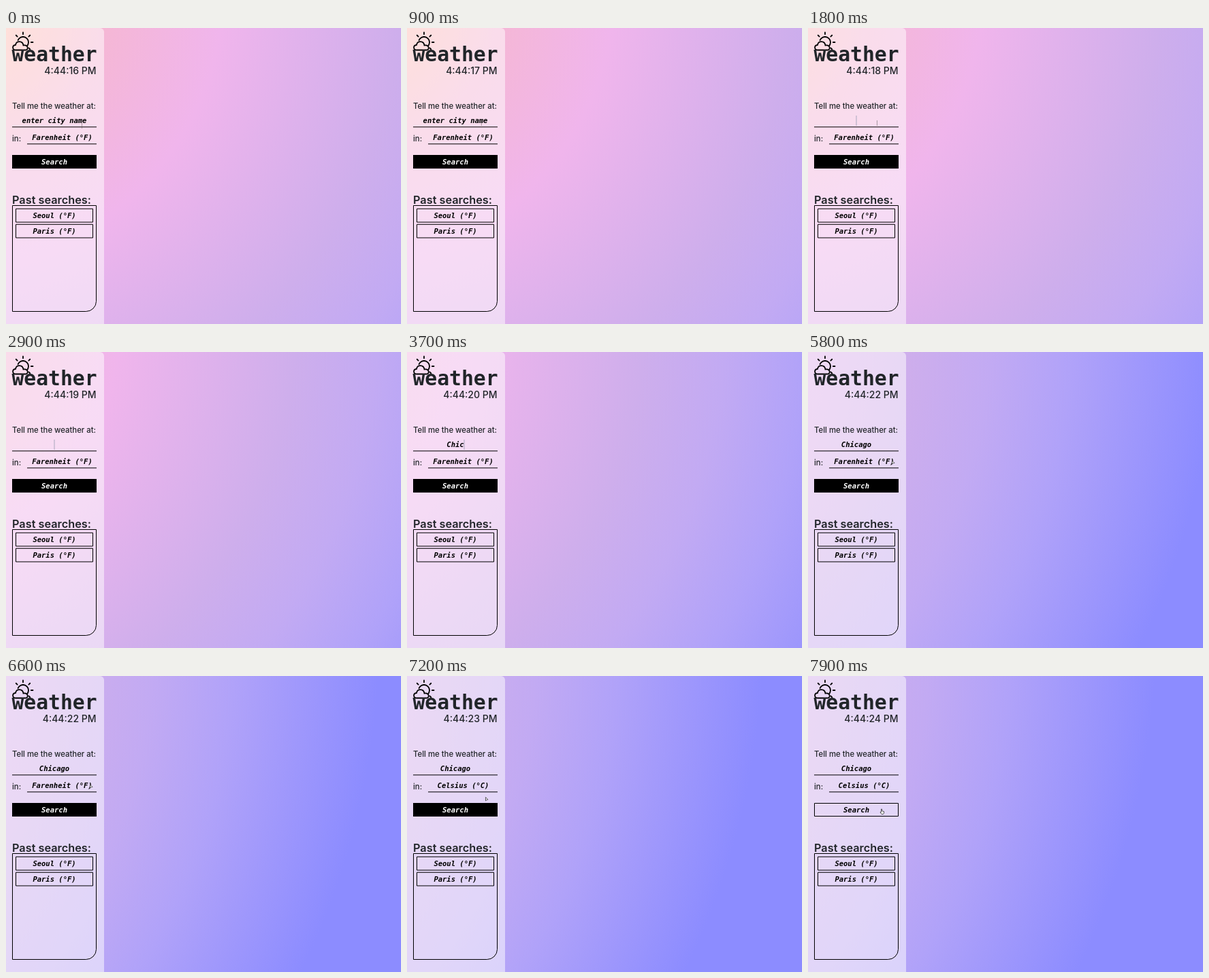
These frames come from a looping animation (580 by 436 pixels, 8 s). An HTML page with a canvas:

```html
<!DOCTYPE html>
<html lang="en">
<head>
<meta charset="utf-8">
<title>Weather</title>
<style>
html, body { margin: 0; width: 100%; height: 100%; overflow: hidden; }
canvas { display: block; width: 580px; height: 436px; }
</style>
</head>
<body>
<canvas id="stage"></canvas>
<script>
const W = 580, H = 436, LOOP = 8000;
const canvas = document.getElementById('stage');
const ctx = canvas.getContext('2d');
const ratio = window.devicePixelRatio || 1;
canvas.width = W * ratio;
canvas.height = H * ratio;

const INK = '#212529';
const SANS = 'Inter, "Open Sans", sans-serif';
const MONO = '"DejaVu Sans Mono", "Liberation Mono", monospace';
const FIELD = 'italic bold 10.5px ' + MONO;
const TITLE = 'bold 29.7px ' + MONO;
const LABEL = '500 11.35px ' + SANS;

// gradient radius and colour
const REACH = 1130;
const STOPS = [
  [0, '#ffc0a8'], [117, '#ffbeb2'], [257, '#f5b7d6'], [420, '#f0b5ec'],
  [680, '#ceaeec'], [800, '#c2aaf3'], [920, '#b0a2f9'], [REACH, '#8c8cff']
];
const POINTER = [
  [0, 111, 144], [700, 111, 140], [1400, 100, 140], [4300, 118, 141],
  [4500, 127, 145], [5300, 125, 163], [6900, 125, 163], [7500, 109, 200], [8000, 109, 200]
];
const CITY = 'Chicago';
const FOCUS = 1450, TYPE_START = 3200, KEY_MS = 130, BLUR = 4480;
const PICK = 7000, HOVER = 7400;

function text(str, x, y, font, color = INK, align = 'left') {
  ctx.font = font;
  ctx.fillStyle = color;
  ctx.textAlign = align;
  ctx.fillText(str, x, y);
}

function line(x1, y1, x2, y2, color = '#000', width = 1) {
  ctx.strokeStyle = color;
  ctx.lineWidth = width;
  ctx.beginPath();
  ctx.moveTo(x1, y1);
  ctx.lineTo(x2, y2);
  ctx.stroke();
}

function box(x, y, w, h, radii = 0) {
  ctx.strokeStyle = '#000';
  ctx.lineWidth = 1;
  ctx.beginPath();
  ctx.roundRect(x + 0.5, y + 0.5, w - 1, h - 1, radii);
  ctx.stroke();
}

function background(t) {
  const cx = -100 - 260 * (1 - Math.cos(Math.PI * t / LOOP)), cy = -60;
  const g = ctx.createRadialGradient(cx, cy, 0, cx, cy, REACH);
  for (const [r, color] of STOPS) g.addColorStop(r / REACH, color);
  ctx.fillStyle = g;
  ctx.fillRect(0, 0, W, H);
  ctx.fillStyle = 'rgba(255,255,255,0.52)';
  ctx.beginPath();
  ctx.roundRect(0, 0, 144, H, [0, 6, 0, 0]);
  ctx.fill();
}

function icon() {
  ctx.lineCap = 'round';
  for (const deg of [-135, -90, -45, 0, 45]) {
    const c = Math.cos(deg * Math.PI / 180), s = Math.sin(deg * Math.PI / 180);
    line(25 + 11.8 * c, 21 + 11.8 * s, 25 + 14.5 * c, 21 + 14.5 * s, '#000', 1.8);
  }
  ctx.beginPath();
  ctx.arc(25, 21, 8, -2.75, 0.65);
  ctx.stroke();
  ctx.beginPath();
  ctx.moveTo(14.5, 32.5);
  ctx.bezierCurveTo(9, 32.5, 8.5, 25.5, 14, 25);
  ctx.bezierCurveTo(15, 18.5, 24.5, 18.5, 25.5, 25.5);
  ctx.bezierCurveTo(33, 24.5, 33.5, 32.5, 28.5, 32.5);
  ctx.closePath();
  ctx.stroke();
  ctx.lineCap = 'butt';
}

function cityField(t) {
  const count = Math.max(0, Math.min(CITY.length, Math.floor((t - TYPE_START) / KEY_MS) + 1));
  const value = t < FOCUS ? 'enter city name' : CITY.slice(0, count);
  text(value, 71, 140, FIELD, '#000', 'center');
  const lastKey = TYPE_START + (count - 1) * KEY_MS;
  const since = t - (count ? lastKey : FOCUS);
  if (t >= FOCUS && t < BLUR && since % 1000 < 500) {
    const x = Math.round(71 + ctx.measureText(value).width / 2);
    line(x, 129, x, 144, '#a9a7bd');
  }
}

function pointerAt(t) {
  let i = 0;
  while (i < POINTER.length - 2 && t >= POINTER[i + 1][0]) i++;
  const [t0, x0, y0] = POINTER[i], [t1, x1, y1] = POINTER[i + 1];
  const p = (t - t0) / (t1 - t0), e = p * p * (3 - 2 * p);
  return [x0 + (x1 - x0) * e, y0 + (y1 - y0) * e];
}

function shape(points, x, y) {
  ctx.beginPath();
  points.forEach(([px, py]) => ctx.lineTo(x + px, y + py));
  ctx.closePath();
  ctx.fillStyle = '#fff';
  ctx.fill();
  ctx.strokeStyle = '#333';
  ctx.lineWidth = 0.8;
  ctx.stroke();
}

function pointer(t) {
  if (t > 2300 && t < 4300) return;
  const [x, y] = pointerAt(t);
  if (t < 4850) {
    ctx.setLineDash([1, 1]);
    line(x + 0.5, y - 3.5, x + 0.5, y + 3.5, '#555');
    ctx.setLineDash([]);
  } else if (y < 186) {
    shape([[-1.5, -3], [2, 0.5], [0.2, 0.8], [-1.5, 2.2]], x, y);
  } else {
    shape([[-1.5, -4], [-0.4, -4], [-0.2, -1], [2.5, -0.5], [2.5, 2], [1.5, 3.5], [-1, 3.5], [-3, 0.5], [-1.5, 0.5]], x, y);
  }
}

function button(t) {
  const k = Math.max(0, Math.min(1, (t - HOVER) / 200));
  ctx.fillStyle = `rgba(0,0,0,${1 - k})`;
  ctx.fillRect(9, 187, 124, 20);
  box(9, 187, 124, 20);
  const v = Math.round(255 * (1 - k));
  text('Search', 71, 201, FIELD, `rgb(${v},${v},${v})`, 'center');
}

function draw(t) {
  ctx.setTransform(ratio, 0, 0, ratio, 0, 0);
  background(t);
  icon();
  text('weather', 8.5, 49.3, TITLE);
  const sec = 16 + Math.floor((t + 300) / 1000);
  text(`4:44:${sec} PM`, 132.5, 68, '500 14px ' + SANS, INK, 'right');

  text('Tell me the weather at:', 9, 118.5, LABEL);
  cityField(t);
  line(9, 145.8, 133, 145.8);
  text('in:', 9, 167, LABEL);
  text(t < PICK ? 'Farenheit (°F)' : 'Celsius (°C)', 82.5, 165, FIELD, '#000', 'center');
  line(31, 170.8, 133, 170.8);
  button(t);

  text('Past searches:', 9, 259, '600 16.3px ' + SANS);
  box(9, 261, 124, 157, [0, 0, 15, 0]);
  ['Seoul', 'Paris'].forEach((name, i) => {
    box(14, 265.8 + 23 * i, 114, 20.7);
    text(name + ' (°F)', 71, 280 + 23 * i, FIELD, '#000', 'center');
  });
  pointer(t);
}

const start = performance.now();
function tick() {
  draw((performance.now() - start) % LOOP);
  requestAnimationFrame(tick);
}
draw(0);
requestAnimationFrame(tick);
</script>
</body>
</html>
```
